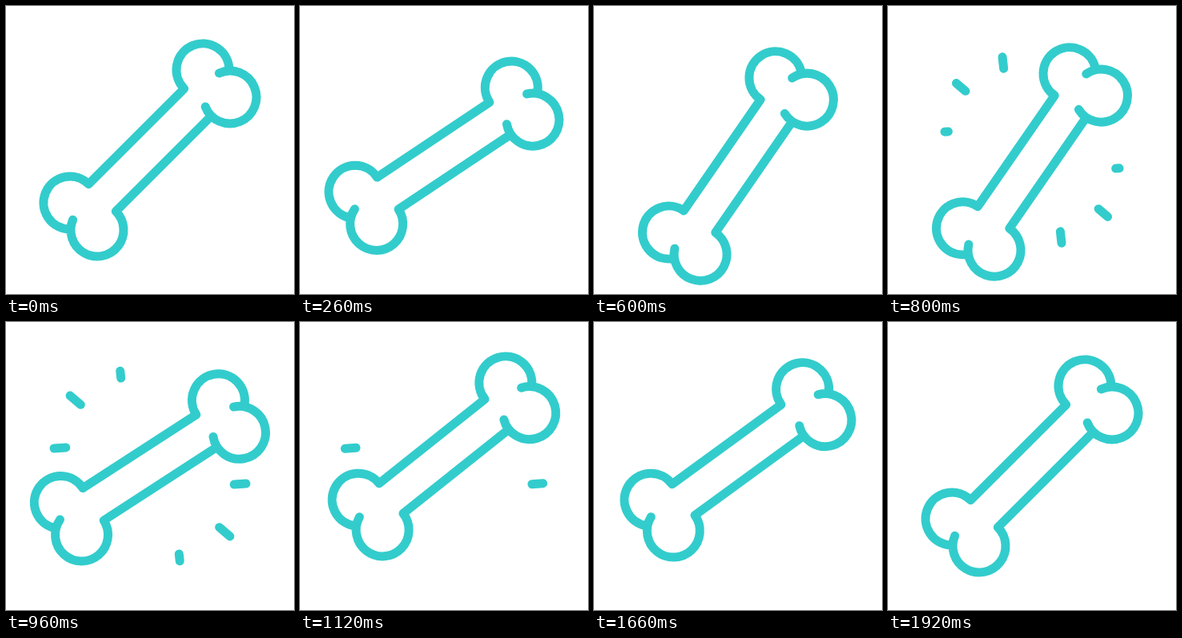
Write an HTML page that moves like this. It is 360x360 px and loops after 2400 ms.

```html
<!DOCTYPE html>
<html lang="en">
<head>
<meta charset="utf-8">
<title>Bone</title>
<style>
  html, body { margin: 0; width: 100%; height: 100%; overflow: hidden; background: #fff; }
  svg { display: block; width: 100vw; height: 100vh; }
</style>
</head>
<body>
<svg viewBox="0 0 360 360" fill="none" stroke="#33cccc" stroke-width="11"
     stroke-linecap="round" stroke-linejoin="round">
  <path id="bone" d="M266.4 83.9A33 33 0 1 1 249.2 125.9
    M279 80A33 33 0 1 0 222.7 103.3L103.3 222.7A33 33 0 1 0 80 279
    M256.7 137.3L137.3 256.7A33 33 0 1 1 83.6 267.2"/>
  <path id="rays"/>
</svg>
<script>
const LOOP = 2400;
const bone = document.getElementById('bone');
const rays = document.getElementById('rays');

// [time, value] keys, eased in and out between neighbours
const angleKeys = [[0, 0], [390, 15], [700, -18], [1010, 14], [1330, -14], [1640, 9], [1920, 0]];
const liftKeys = [[0, 0], [640, 20.3], [1320, -20], [1910, 0]];

// Each ray also has a copy turned half way round the centre
const rayList = [
  { x: 144.7, y: 79, dx: -0.11, dy: -0.994, length: 18, start: 600, span: 430 },
  { x: 97, y: 106.5, dx: -0.76, dy: -0.65, length: 23, start: 670, span: 430 },
  { x: 75.3, y: 156.9, dx: -0.997, dy: 0.07, length: 19.5, start: 760, span: 500 }
];

function valueAt(keys, t) {
  const i = keys.findIndex(key => key[0] > t);
  if (i < 0) return keys[keys.length - 1][1];
  const [t0, a] = keys[i - 1], [t1, b] = keys[i];
  return a + (b - a) * (1 - Math.cos(Math.PI * (t - t0) / (t1 - t0))) / 2;
}

function rayPath(ray, t) {
  const u = (t - ray.start) / ray.span;
  if (u <= 0 || u >= 1) return '';
  const tail = ray.length * u ** 4;
  const head = ray.length * (1 - (1 - u) ** 3);
  if (head - tail < 0.5) return '';
  const at = d => [ray.x + ray.dx * d, ray.y + ray.dy * d];
  const ends = [at(tail), at(head)];
  const mirrored = ends.map(([x, y]) => [360 - x, 360 - y]);
  return [ends, mirrored].map(line => 'M' + line.join('L')).join('');
}

function draw(t) {
  const angle = valueAt(angleKeys, t), lift = valueAt(liftKeys, t);
  bone.setAttribute('transform', `translate(0 ${lift}) rotate(${angle} 180 180)`);
  rays.setAttribute('d', rayList.map(ray => rayPath(ray, t)).join(''));
}

const begin = performance.now();
function frame() {
  draw((performance.now() - begin) % LOOP);
  requestAnimationFrame(frame);
}
frame();
</script>
</body>
</html>
```
